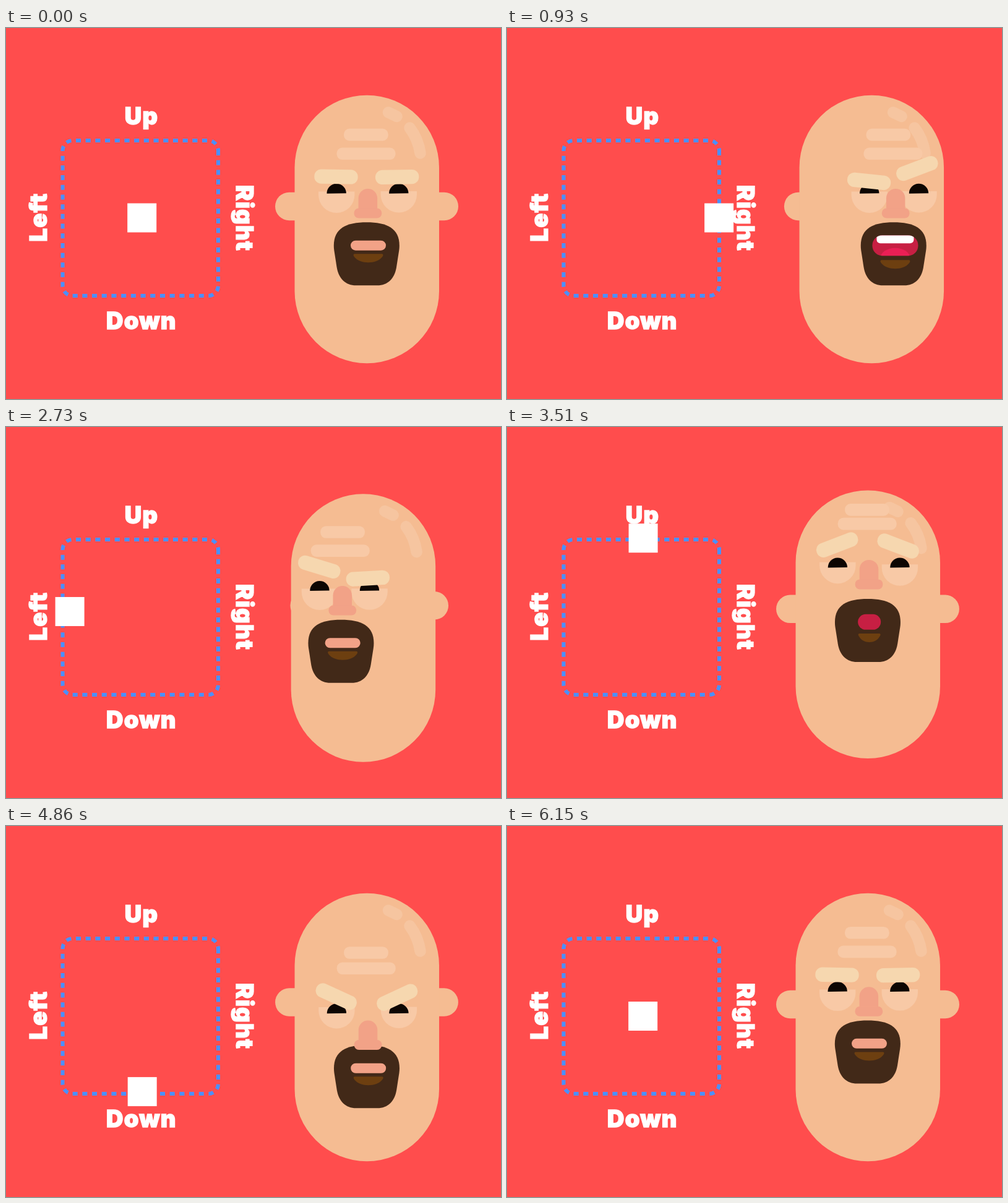
These frames come from a looping animation (800x600 px, 6450 ms). An HTML page with a canvas:

```html
<!DOCTYPE html>
<html lang="en">
<head>
<meta charset="utf-8">
<title>Face joystick</title>
<style>
html, body { margin: 0; width: 100%; height: 100%; overflow: hidden; background: #ff4d4d; }
canvas { display: block; width: 800px; height: 600px; }
</style>
</head>
<body>
<canvas id="stage" width="800" height="600"></canvas>
<script>
const ctx = document.getElementById('stage').getContext('2d');
const LOOP = 6450;
const HOME = { x: 219.7, y: 307 };

const SKIN = '#f5bc92', LIGHT = '#f8c9a6', SHINE = '#f6c5a0', PINK = '#f2a287';
const BROW = '#f6d7af', BEARD = '#422918', PATCH = '#6d3f10';

// Joystick moves: start time and travel
const MOVES = [
  [0, 123, 0],
  [1249, -248, 0],
  [2640, 125.5, -127.4],
  [4020, 0, 250.2],
  [5580, -0.5, -122.8]
];

// Mouth shapes: width, height, how far the soul patch drops, its width
const MOUTHS = {
  closed: [57, 16, 0, 49],
  small: [37, 25, 5, 37],
  wide: [74, 33, 10, 49],
  big: [74, 40, 13, 49]
};

const SPEECH = [
  [0, 'closed'],
  [690, 'small'], [780, 'wide'], [870, 'small'], [930, 'wide'],
  [1050, 'small'], [1110, 'wide'], [1200, 'small'], [1260, 'closed'],
  [1470, 'wide'],
  [2010, 'small'], [2070, 'wide'], [2160, 'small'], [2220, 'wide'], [2310, 'small'],
  [2460, 'closed'],
  [3390, 'wide'], [3510, 'small'], [3570, 'big'], [3690, 'wide'],
  [3780, 'small'], [3870, 'wide'], [3990, 'closed'],
  [4770, 'small'], [4860, 'closed'],
  [5190, 'small'], [5250, 'wide'], [5310, 'small'], [5370, 'wide'],
  [5430, 'small'], [5460, 'closed']
];

// Quick start, long settling tail
function ease(ms) {
  if (ms <= 0) return 0;
  return 1 / (1 + Math.pow(165.6 / ms, 4.4));
}

function stick(t) {
  let x = 0, y = 0;
  for (const [start, dx, dy] of MOVES) {
    const p = ease(t - start);
    x += dx * p;
    y += dy * p;
  }
  return { x, y };
}

function mouthAt(t) {
  let name = 'closed';
  for (const [start, shape] of SPEECH) if (t >= start) name = shape;
  return name;
}

// Offset for a stick axis: "neg" at -1, "pos" at +1
const mix = (v, neg, pos) => v < 0 ? -v * neg : v * pos;

function box(x, y, w, h, r, color) {
  ctx.beginPath();
  ctx.roundRect(x, y, w, h, r);
  ctx.fillStyle = color;
  ctx.fill();
}

function label(text, x, y, angle) {
  ctx.save();
  ctx.translate(x, y);
  ctx.rotate(angle);
  ctx.fillText(text, 0, 0);
  ctx.strokeText(text, 0, 0);
  ctx.restore();
}

function drawPad() {
  ctx.strokeStyle = '#4a90ff';
  ctx.lineWidth = 6;
  ctx.setLineDash([8, 7.7]);
  const l = 91.5, r = 343, t = 182, b = 433, c = 16;
  ctx.beginPath();
  ctx.moveTo(r, t + c);
  ctx.arcTo(r, b, l, b, c);
  ctx.arcTo(l, b, l, t, c);
  ctx.arcTo(l, t, r, t, c);
  ctx.arcTo(r, t, r, b, c);
  ctx.closePath();
  ctx.stroke();
  ctx.setLineDash([]);

  ctx.fillStyle = ctx.strokeStyle = '#fff';
  ctx.lineWidth = 1.4;
  ctx.lineJoin = 'miter';
  ctx.miterLimit = 3;
  ctx.font = '900 38px Inter, sans-serif';
  ctx.letterSpacing = '1.2px';
  ctx.textAlign = 'center';
  label('Up', 219, 155.5, 0);
  label('Down', 218.8, 486.5, 0);
  label('Left', 65.5, 306, -Math.PI / 2);
  label('Right', 371.5, 307.6, Math.PI / 2);
}

function drawHead(u, v) {
  const earY = 265.7 + mix(v, 5.8, -3.5);
  box(435 + mix(u, 26, 13), earY, 80, 45.5, 22.7, SKIN);
  box(651 + mix(u, -17, -26), earY, 80, 45.5, 22.7, SKIN);

  ctx.save();
  ctx.translate(mix(u, -6.2, 6.1), mix(v, -6.2, 0));
  box(466.5, 108.7, 233.5, 433.5, 116.7, SKIN);
  ctx.strokeStyle = SHINE;
  ctx.lineWidth = 18.5;
  ctx.lineCap = 'round';
  ctx.lineJoin = 'round';
  ctx.beginPath();
  ctx.moveTo(618, 136.5);
  ctx.lineTo(631.5, 143);
  ctx.moveTo(652.5, 161.5);
  ctx.quadraticCurveTo(666, 179, 669.5, 202.5);
  ctx.stroke();
  ctx.restore();

  box(546 + mix(u, -40.2, 34.8), 162.8 + mix(v, -38, 33), 71.7, 19.6, 9, LIGHT);
  box(534.5 + mix(u, -44.5, 42.3), 193.5 + mix(v, -45.8, 27.5), 95, 19.6, 9, LIGHT);
}

function drawEye(x, lidY, pupilY) {
  box(x - 29.2, lidY, 58.4, 34.5, [0, 0, 29.2, 29.2], LIGHT);
  const tilt = -0.015;
  ctx.beginPath();
  ctx.arc(x, pupilY, 15.7, Math.PI + tilt, tilt);
  ctx.fillStyle = '#0d0602';
  ctx.fill();
}

function drawBrow(x, y, degrees) {
  ctx.save();
  ctx.translate(x, y);
  ctx.rotate(degrees * Math.PI / 180);
  box(-35.2, -11.7, 70.4, 23.4, 11.2, BROW);
  ctx.restore();
}

function drawEyes(u, v) {
  const lx = mix(u, -29, 52), rx = mix(u, -50.3, 31);
  const pupilY = 267.5 + mix(v, -39.5, 36.1);
  drawEye(534.2 + lx, 264.5 + mix(v, -45, 29), pupilY);
  drawEye(634.8 + rx, 264 + mix(v, -41, 29), pupilY);
  drawBrow(533.5 + lx, 240.5 + mix(u, -11.5, 7.5) + mix(v, -49, 36),
    1 + mix(u, 18.5, 5) + mix(v, -21.6, 24));
  drawBrow(632.1 + rx, 241 + mix(u, 7.5, -14) + mix(v, -47.5, 37),
    -1 + mix(u, -4, -20) + mix(v, 21.6, -24.4));
}

function drawMouth(name) {
  const [w, h, drop, patch] = MOUTHS[name];
  const open = name === 'wide' || name === 'big';
  const x = 585.5, y = 351.7, top = y - h / 2, bottom = y + h / 2;

  ctx.save();
  box(x - w / 2, top, w, h, Math.min(h / 2, 16), name === 'closed' ? PINK : '#c71f43');
  if (open) {
    ctx.clip();
    ctx.beginPath();
    ctx.ellipse(x, bottom + 3, 23.5, 15.5, 0, 0, Math.PI * 2);
    ctx.fillStyle = '#ea1f55';
    ctx.fill();
    box(x - 30, top, 60, 13, [3, 3, 6, 6], '#fff');
  }
  ctx.restore();

  const half = patch / 2, py = 365.3 + drop;
  ctx.beginPath();
  ctx.moveTo(x - half + 2, py);
  ctx.lineTo(x + half - 2, py);
  ctx.quadraticCurveTo(x + half + 1, py + 1, x + half - 2, py + 5);
  ctx.bezierCurveTo(x + half * 0.55, py + 17, x - half * 0.55, py + 17, x - half + 2, py + 5);
  ctx.quadraticCurveTo(x - half - 1, py + 1, x - half + 2, py);
  ctx.fillStyle = PATCH;
  ctx.fill();
}

function drawBeard(u, v, mouth) {
  ctx.save();
  ctx.translate(mix(u, -44, 42.3), mix(v, -35.7, 40.8));
  ctx.beginPath();
  ctx.moveTo(529.8, 352);
  ctx.bezierCurveTo(529.8, 324, 550, 314.3, 582.8, 314.3);
  ctx.bezierCurveTo(615.6, 314.3, 635.8, 324, 635.8, 352);
  ctx.quadraticCurveTo(635.8, 356, 635.2, 360);
  ctx.lineTo(631, 387);
  ctx.bezierCurveTo(628, 405, 617, 416.3, 600, 416.3);
  ctx.lineTo(565.6, 416.3);
  ctx.bezierCurveTo(548.6, 416.3, 537.6, 405, 534.6, 387);
  ctx.lineTo(530.4, 360);
  ctx.quadraticCurveTo(529.8, 356, 529.8, 352);
  ctx.fillStyle = BEARD;
  ctx.fill();
  drawMouth(mouth);
  ctx.restore();
}

function drawNose(u, v) {
  ctx.save();
  ctx.translate(mix(u, -43.7, 43.7), mix(v, -44.3, 55.5));
  box(569.6, 260, 30.5, 40, [15.2, 15.2, 0, 0], PINK);
  box(562.5, 291.5, 44.7, 16, 7.5, PINK);
  ctx.restore();
}

function draw(t) {
  const pos = stick(t);
  const u = pos.x / 124, v = pos.y / 125;
  ctx.fillStyle = '#ff4d4d';
  ctx.fillRect(0, 0, 800, 600);
  drawPad();
  drawHead(u, v);
  drawEyes(u, v);
  drawBeard(u, v, mouthAt(t));
  drawNose(u, v);
  ctx.fillStyle = '#fff';
  ctx.fillRect(HOME.x + pos.x - 23.5, HOME.y + pos.y - 23.5, 47, 47);
}

const begin = performance.now();
function tick() {
  draw((performance.now() - begin) % LOOP);
  requestAnimationFrame(tick);
}
tick();
</script>
</body>
</html>
```
